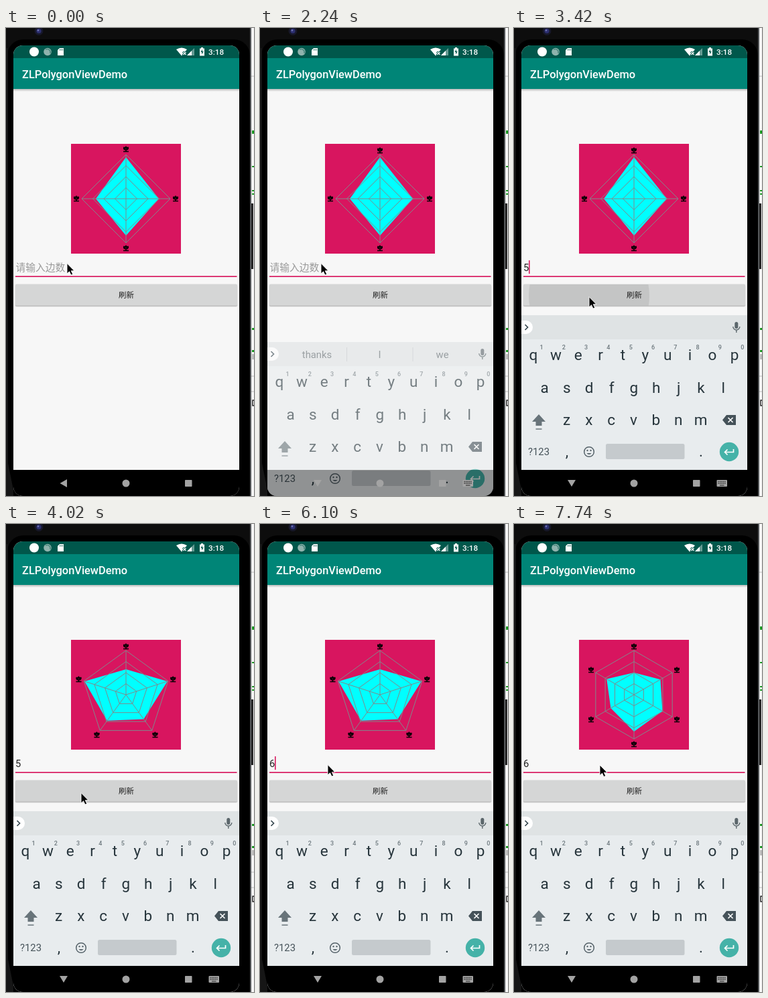
Animation of 370x699 px, one loop 8000 ms. Source, as an HTML page:

```html
<!DOCTYPE html>
<html lang="zh-CN">
<head>
<meta charset="utf-8">
<title>ZLPolygonViewDemo</title>
<style>
  html, body { margin: 0; width: 100%; height: 100%; overflow: hidden; background: #000; }
  svg { display: block; width: 370px; height: 699px; }
  text { font-family: Roboto, "Noto Sans CJK SC", "Noto Sans CJK", sans-serif; }
  .mid { text-anchor: middle; }
  .key { font-size: 22.5px; fill: #26343b; }
  .num { font-size: 9px; fill: #6c777d; font-weight: 500; }
  .word { font-size: 14.8px; fill: #626b70; }
  .label { font-size: 8.5px; font-weight: 700; stroke: #000; stroke-width: .6; }
  .grid { fill: none; stroke: #80898b; stroke-width: 1; }
</style>
</head>
<body>
<svg id="stage" viewBox="0 0 370 699" xmlns="http://www.w3.org/2000/svg">
  <defs>
    <clipPath id="screenClip"><rect x="11" y="26" width="337" height="673" rx="14"/></clipPath>
    <clipPath id="buttonClip"><rect x="14" y="383" width="331" height="31.5" rx="1.6"/></clipPath>
    <linearGradient id="barShade" x2="0" y2="1">
      <stop stop-color="#000" stop-opacity=".25"/><stop offset="1" stop-color="#000" stop-opacity="0"/>
    </linearGradient>
  </defs>

  <!-- phone body and the window behind it -->
  <rect width="370" height="699" fill="#0d0d0d"/>
  <rect x="2" y="17" width="362" height="720" rx="24"/>
  <path d="M0 30H3V650L11 690V699H0Z" fill="#161616"/>
  <circle cx="49" cy="4.500" r="6.500" fill="#17182a"/>
  <circle cx="49" cy="4.500" r="3.600" fill="#2c2f70"/>
  <circle cx="48" cy="3.500" r="1.300" fill="#7378b4"/>
  <rect x="364" width="6" height="699" fill="#55585a"/>
  <rect x="366" width="4" height="699" fill="#f4f4f4"/>
  <path d="M366 72H370M366 520H370M366 543H370" stroke="#bbb"/>
  <path d="M367 153h3v5h-3zM367 206h3v2h-3zM367 242h3v2h-3zM367 247h3v2h-3zM367 448h3v3h-3zM367 481h3v3h-3z" fill="#16941d"/>
  <path d="M366 262h3v98h-3z" fill="#252525"/>
  <path d="M367 487h3v8h-3z" fill="#b7b7b7"/>
  <path d="M370 556h-2v8h2" fill="none" stroke="#222" stroke-width="1.500"/>

  <g clip-path="url(#screenClip)">
    <rect x="11" y="26" width="337" height="673" fill="#f7f7f7"/>
    <rect x="11" y="91" width="337" height="4" fill="url(#barShade)"/>
    <rect x="11" y="45" width="337" height="46" fill="#008577"/>
    <rect x="11" y="26" width="337" height="19" fill="#00574b"/>
    <text x="24" y="74.500" font-size="16.400" font-weight="500" fill="#fff">ZLPolygonViewDemo</text>

    <g fill="#fff">
      <circle cx="42" cy="35.500" r="7"/>
      <circle cx="62" cy="35.500" r="5.800" fill="#8fb3ad"/>
      <path d="M59 32a5 5 0 0 1 7 6" fill="none" stroke="#4d8a80" stroke-width="1.500"/>
      <path d="M80 30H86V41H77V33Z"/>
      <path d="M80.500 31.500v2M82.500 31.500v2M84.500 31.500v2" stroke="#00574b" stroke-width=".9"/>
      <path d="M254 32Q262 27 270 32L262 41.500Z"/>
      <path d="M264 35.500l5 5m0-5l-5 5" stroke="#00574b" stroke-width="3"/>
      <path d="M264.500 36l4 4m0-4l-4 4" stroke="#fff" stroke-width="1.200"/>
      <path d="M281 30V41H270Z" opacity=".4"/><path d="M277 34V41H270Z"/>
      <path d="M289 30.500h2v-1.500h3v1.500h2V41.500h-7z"/>
      <path d="M293 32l-2.500 4h1.700v3.500l2.500-4.500h-1.700z" fill="#00574b"/>
      <text x="302" y="39.700" font-size="11.700" font-weight="500">3:18</text>
    </g>

    <rect x="97" y="173" width="164" height="164" fill="#d8155f"/>
    <g id="chart"></g>

    <text id="hint" x="14.500" y="362.500" font-size="14.750" fill="#999">请输入边数</text>
    <text id="value" x="14" y="362.800" font-size="14.750" fill="#212121"></text>
    <rect id="caret" y="347" width="1.600" height="20" fill="#d81b60"/>
    <rect x="14" y="370.300" width="330.500" height="1.700" fill="#d81b60"/>

    <rect x="13.500" y="384" width="332" height="32.500" rx="2" fill="#000" opacity=".1"/>
    <rect x="14" y="384" width="331" height="31.800" rx="2" fill="#000" opacity=".16"/>
    <rect x="14" y="382.500" width="331" height="32" rx="1.600" fill="#d5d6d6"/>
    <g clip-path="url(#buttonClip)"><circle id="ripple" cy="400" fill="#000"/></g>
    <text class="mid" x="179.500" y="402.600" font-size="11.500" font-weight="500" fill="#212121">刷新</text>
    <path id="handle" d="M22.500 368L28.500 374A8.500 8.500 0 1 1 16.500 374Z" fill="#d81b60"/>

    <rect x="11" y="660" width="337" height="39" fill="#000"/>
    <g id="keyboard"></g>
    <g fill="#a3a3a3">
      <path id="back"/>
      <circle cx="179" cy="680" r="5.500"/>
      <rect x="267" y="675" width="10.500" height="10" rx=".8"/>
      <g id="imeIcon">
        <rect x="302.500" y="675" width="15.500" height="10" rx="1"/>
        <path d="M304.500 677.500h12M304.500 680h12" stroke="#222" stroke-width="1.300" stroke-dasharray="1.300 1.100"/>
        <path d="M307 683h6.500" stroke="#222" stroke-width="1.200"/>
      </g>
    </g>
  </g>
  <path id="pointer" d="M0 0V15.500L3.500 12.200L6 17.500L8.700 16.300L6.300 11.200H11Z" fill="#000" stroke="#fff" stroke-width=".9"/>
</svg>

<script>
const $ = id => document.getElementById(id);
const LOOP = 8000, CX = 179, CY = 255, RADIUS = 66, LABEL_R = 74;

// values of the filled shape, clockwise from the top
const SHAPES = {
  4: [62, 49, 55, 45],
  5: [38, 65, 45, 48, 65],
  6: [33, 45.5, 49, 55, 40, 47]
};

const text = (cls, x, y, s) => `<text class="${cls}" x="${x}" y="${y}">${s}</text>`;

function point(i, n, r) {
  const a = 2 * Math.PI * i / n;
  return [CX + r * Math.sin(a), CY - r * Math.cos(a)].map(v => +v.toFixed(2));
}

function chartSvg(n, topShift) {
  const ring = f => SHAPES[n].map((v, i) => point(i, n, f(v))).join(" ");
  let out = `<polygon points="${ring(v => v)}" fill="#0ff"/>`;
  for (let k = 1; k <= 4; k++) out += `<polygon class="grid" points="${ring(() => RADIUS * k / 4)}"/>`;
  for (let i = 0; i < n; i++) {
    const [x, y] = point(i, n, RADIUS), [lx, ly] = point(i, n, LABEL_R);
    out += `<path class="grid" d="M${CX} ${CY}L${x} ${y}"/>`;
    out += text("label mid", lx, ly + 3.2 + (i ? 0 : topShift), "空");
  }
  return out;
}

function keyboardSvg() {
  const row = (keys, x0, y) => [...keys].map((c, i) => text("key mid", x0 + 33.35 * i, y, c)).join("");
  const digits = [..."1234567890"].map((c, i) => text("num mid", 41 + 33.3 * i, 480, c)).join("");
  return `
    <rect x="11" y="429" width="337" height="271" fill="#e8ecee"/>
    <rect x="11" y="429" width="337" height="36" fill="#dfe3e4"/>
    <rect x="0" y="437" width="28" height="20" rx="10" fill="#fff"/>
    <path d="M16.500 443l4 4-4 4" fill="none" stroke="#37474f" stroke-width="1.700"/>
    <g id="words">
      ${text("word mid", 85, 452.5, "thanks")}${text("word mid", 178.5, 452.5, "I")}${text("word mid", 272, 452.5, "we")}
      <path d="M129.500 437V458M228 437V458" stroke="#c3c8ca"/>
    </g>
    <rect x="329.300" y="439" width="5" height="10" rx="2.500" fill="#5b666b"/>
    <path d="M326.800 446a5 5 0 0 0 10 0M331.800 451v4" fill="none" stroke="#5b666b" stroke-width="1.400"/>
    ${row("qwertyuiop", 29, 496)}${digits}${row("asdfghjkl", 45.5, 544.5)}${row("zxcvbnm", 78.5, 593)}
    <path d="M37 577L47 588H41.500V594H32.500V588H27Z" fill="#68747a"/>
    <path d="M32.500 599H41.500" stroke="#68747a" stroke-width="1.500"/>
    <path d="M311 585.500L317 578H331V593H317Z" fill="#455259"/>
    <path d="M319.500 582l7 7m0-7l-7 7" stroke="#fff" stroke-width="1.600"/>
    <text class="mid" x="37" y="638" font-size="14.800" fill="#455259">?123</text>
    ${text("key mid", 79, 640, ",")}${text("key mid", 279, 640, ".")}
    <circle cx="112" cy="633" r="7.300" fill="none" stroke="#56636a" stroke-width="1.500"/>
    <path d="M108.500 635a4 4 0 0 0 7 0z" fill="#56636a"/>
    <circle cx="109.500" cy="631" r="1.200" fill="#56636a"/><circle cx="114.500" cy="631" r="1.200" fill="#56636a"/>
    <rect x="137" y="621" width="117.500" height="23" rx="2.500" fill="#c5cacd"/>
    <circle cx="321" cy="633" r="14.200" fill="#45b2a8"/>
    <path d="M327.500 629v4.500H315M318.500 629.500l-4 4 4 4" fill="none" stroke="#fff" stroke-width="1.700"/>`;
}

// each step [time, changes] keeps everything it does not mention
const STEPS = [
  [0, { sides: 4, shift: 0, value: "", caret: 0, at: [91, 351.5], kb: [0, 0], words: 1, ripple: [0, 0, 0], handle: 0 }],
  [450, { caret: 1 }],
  [900, { caret: 0 }],
  [1340, { caret: 1 }],
  [1790, { caret: 0 }],
  [2090, { kb: [95, .2], shift: 1.5 }],
  [2240, { kb: [40, .62] }],
  [2390, { kb: [0, 1], caret: 1 }],
  [2540, { value: "5", words: 0 }],
  [2830, { at: [95, 366] }],
  [2980, { at: [106, 389], caret: 0 }],
  [3130, { at: [112, 401.5] }],
  [3420, { ripple: [112, 90, .08], caret: 1 }],
  [3570, { ripple: [112, 300, .06], sides: 5 }],
  [3870, { ripple: [112, 300, .03] }],
  [4020, { ripple: [112, 300, .015], caret: 0 }],
  [4320, { at: [110, 388], ripple: [0, 0, 0] }],
  [4470, { at: [104, 367] }],
  [4610, { at: [101, 359.5], caret: 1 }],
  [5050, { caret: 0, handle: 1 }],
  [5500, { value: "", caret: 1, handle: 0, words: .5 }],
  [5650, { words: 1 }],
  [6100, { value: "6", words: 0 }],
  [6400, { at: [104, 368] }],
  [6550, { at: [113, 388], caret: 0 }],
  [6700, { at: [118, 396] }],
  [6850, { ripple: [118, 90, .08] }],
  [6990, { ripple: [118, 300, .06], sides: 6, caret: 1 }],
  [7140, { ripple: [118, 300, .03] }],
  [7440, { at: [122, 381], ripple: [118, 300, .015], caret: 0 }],
  [7590, { at: [126, 365], ripple: [0, 0, 0] }],
  [7740, { at: [128, 360] }]
];
const states = [];
for (const [time, change] of STEPS) states.push({ ...states.at(-1), ...change, time });

const set = (id, attrs) => {
  for (const name in attrs) $(id).setAttribute(name, attrs[name]);
};

function draw(s) {
  $("chart").innerHTML = chartSvg(s.sides, s.shift);
  $("value").textContent = s.value;
  set("hint", { opacity: s.value ? 0 : 1 });
  set("caret", { x: s.value ? 22 : 14.2, opacity: s.caret });
  set("handle", { opacity: s.handle });
  set("words", { opacity: s.words });
  set("pointer", { transform: `translate(${s.at})` });
  const [dy, shown] = s.kb, [cx, r, shade] = s.ripple;
  set("keyboard", { transform: `translate(0 ${dy})`, opacity: shown });
  set("ripple", { cx, r, opacity: shade });
  set("back", { d: shown ? "M80 675H92L86 685Z" : "M91 674V686L80.500 680Z" });
  set("imeIcon", { opacity: shown ? 1 : 0 });
  // the bare navigation bar hides the resting keyboard
  set("keyboard", { visibility: shown ? "visible" : "hidden" });
}

$("keyboard").innerHTML = keyboardSvg() + `<rect id="navFill" x="11" y="660" width="337" height="40"/>`;

let current, start = performance.now();
function tick() {
  const t = Math.max(0, performance.now() - start) % LOOP;
  const s = states.findLast(step => step.time <= t);
  if (s !== current) {
    draw(current = s);
    set("navFill", { opacity: s.kb[0] ? 0 : 1 });
  }
  requestAnimationFrame(tick);
}
tick();
</script>
</body>
</html>
```
